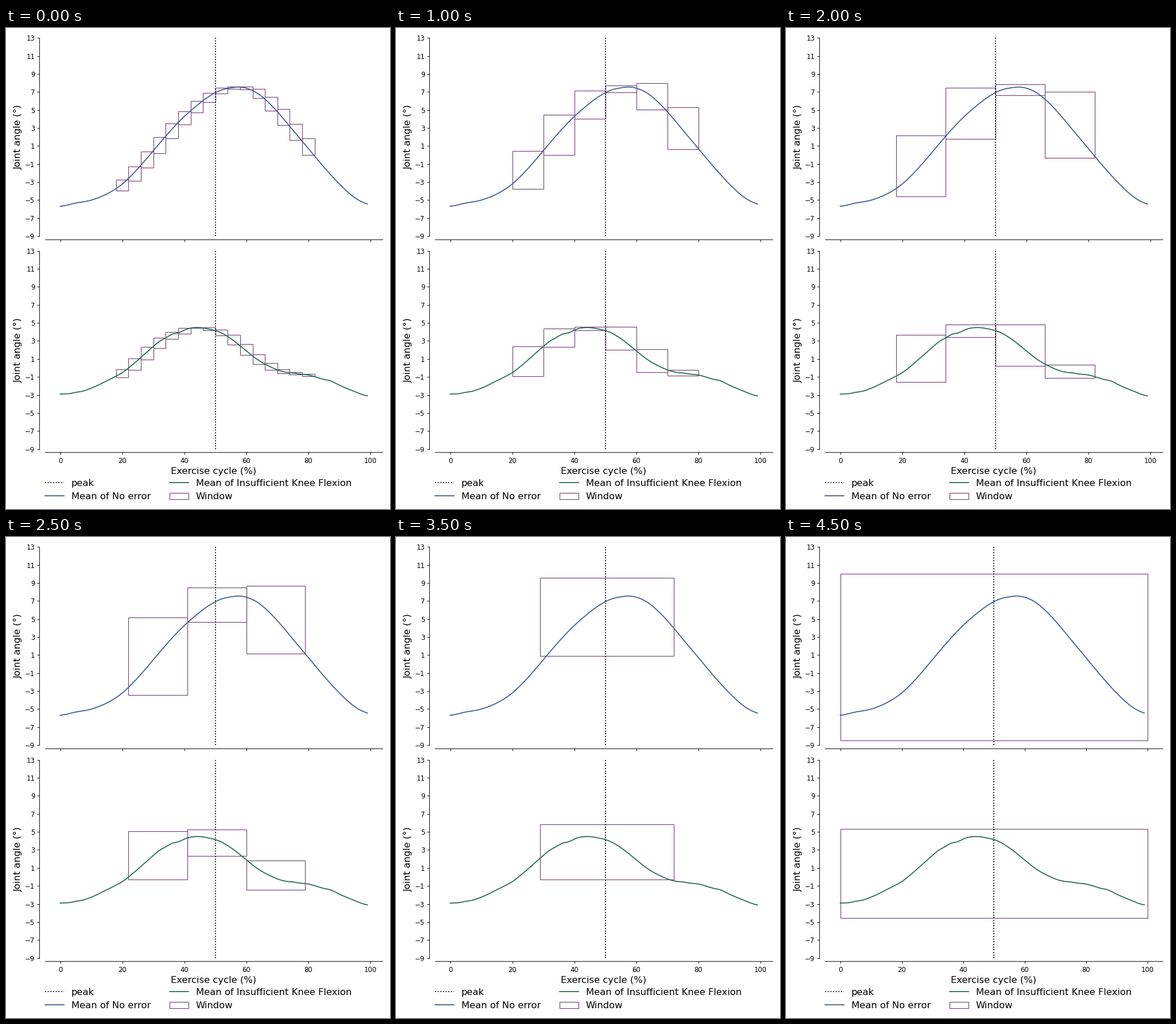
Animation, 669 px wide and 837 px high, one loop 5000 ms. Source, as a matplotlib script:

```python
import numpy as np
import matplotlib.pyplot as plt
from matplotlib.animation import FuncAnimation
from matplotlib.patches import Rectangle

W, H, DPI = 669, 837, 84
BLUE, GREEN, PURPLE = "#415c90", "#276a50", "#76437c"
WIDTHS = [4, 7, 10, 13, 16, 19, 22, 43, 49, 100]
SPAN = 65  # samples around the peak that small windows may cover
PEAK = 50

plt.rcParams.update({"font.family": "DejaVu Sans", "font.size": 10})

NO_ERROR = [
    (0, -5.68), (1, -5.64), (4.5, -5.36), (10, -5.0), (15, -4.32),
    (19.5, -3.35), (23.5, -2.07), (27.5, -.54), (31.5, 1.09), (35.5, 2.68),
    (39.5, 4.12), (43.5, 5.34), (47.5, 6.40), (51.5, 7.16), (55.5, 7.48),
    (57.5, 7.55), (59.5, 7.46), (63.5, 6.87), (67.5, 5.71), (71.5, 4.21),
    (75.5, 2.55), (79.5, .92), (85, -1.34), (90, -3.22), (95, -4.75),
    (97, -5.16), (99, -5.44)]
LOW_FLEXION = [
    (0, -2.9), (3, -2.85), (5, -2.71), (7, -2.6), (10, -2.25), (15, -1.43),
    (18, -.91), (20, -.53), (23.5, .42), (27.5, 1.62), (30, 2.38),
    (32, 2.95), (34, 3.33), (36, 3.73), (38, 3.88), (41, 4.33), (45, 4.47),
    (47.5, 4.34), (51.5, 3.95), (55.5, 3.12), (59.5, 2.03), (63.5, .94),
    (67.5, .155), (71.5, -.39), (73, -.5), (75, -.56), (77, -.68),
    (80, -.79), (82, -.97), (85, -1.28), (87, -1.42), (90, -1.92),
    (95, -2.64), (98, -3.03), (99, -3.1)]


def smooth(points):
    """Cubic Hermite curve through the points, sampled at 0..99."""
    x, y = np.array(points, float).T
    m = np.gradient(y, x)
    t = np.arange(100.0)
    i = np.clip(np.searchsorted(x, t, side="right") - 1, 0, len(x) - 2)
    h = x[i + 1] - x[i]
    u = (t - x[i]) / h
    return (y[i] * (1 + 2 * u) * (1 - u) ** 2 + h * m[i] * u * (1 - u) ** 2
            + y[i + 1] * u * u * (3 - 2 * u) + h * m[i + 1] * u * u * (u - 1))


def make_axes(top):
    ax = fig.add_axes([67.8 / W, 1 - (top + 345) / H, 588.5 / W, 345 / H])
    ax.set_ylim(-9, 13)
    ax.set_yticks(range(-9, 14, 2))
    ax.set_xticks(range(0, 101, 20))
    ax.set_ylabel("Joint angle (°)", fontsize=14)
    for side in ("top", "right"):
        ax.spines[side].set_visible(False)
    ax.spines["left"].set_position(("outward", 8))
    ax.spines["bottom"].set_position(("outward", 5))
    return ax


def make_box(ax):
    return ax.add_patch(Rectangle((0, 0), 1, 1, fill=False, ec=PURPLE, lw=1))


# The small surplus keeps the pixel size from rounding down.
fig = plt.figure(figsize=((W + .01) / DPI, (H + .01) / DPI), dpi=DPI,
                 facecolor="white")
panels = []
for top, points, color in ((17.2, NO_ERROR, BLUE), (387.6, LOW_FLEXION, GREEN)):
    ax = make_axes(top)
    data = smooth(points)
    line, = ax.plot(data, color=color, lw=1.5)
    peak = ax.axvline(PEAK, color="black", ls=":", lw=1.5)
    boxes = [make_box(ax) for _ in range(SPAN // WIDTHS[0])]
    panels.append((ax, data, boxes, line))

panels[0][0].tick_params(labelbottom=False)
panels[1][0].set_xlabel("Exercise cycle (%)", fontsize=14)
fig.legend([peak, panels[0][3], panels[1][3], boxes[0]],
           ["peak", "Mean of No error",
            "Mean of Insufficient Knee Flexion", "Window"],
           loc="lower left", bbox_to_anchor=(61.7 / W, 7.3 / H),
           ncol=2, fontsize=14, frameon=False, borderaxespad=0)


def draw(frame):
    width = WIDTHS[frame]
    count = max(1, SPAN // width)
    start = PEAK - count * width // 2
    last = max(99, start + count * width)
    changed = []
    for ax, data, boxes, _ in panels:
        ax.set_xlim(-.05 * last, 1.05 * last)
        for k, box in enumerate(boxes):
            box.set_visible(k < count)
            if k < count:
                left = start + k * width
                part = data[left:left + width]
                spread = 2 * part.std()
                box.set_bounds(left, part.mean() - spread, width, 2 * spread)
        changed += boxes
    return changed


anim = FuncAnimation(fig, draw, frames=len(WIDTHS), interval=500,
                     repeat=True, repeat_delay=0, blit=False)
plt.show()
```
